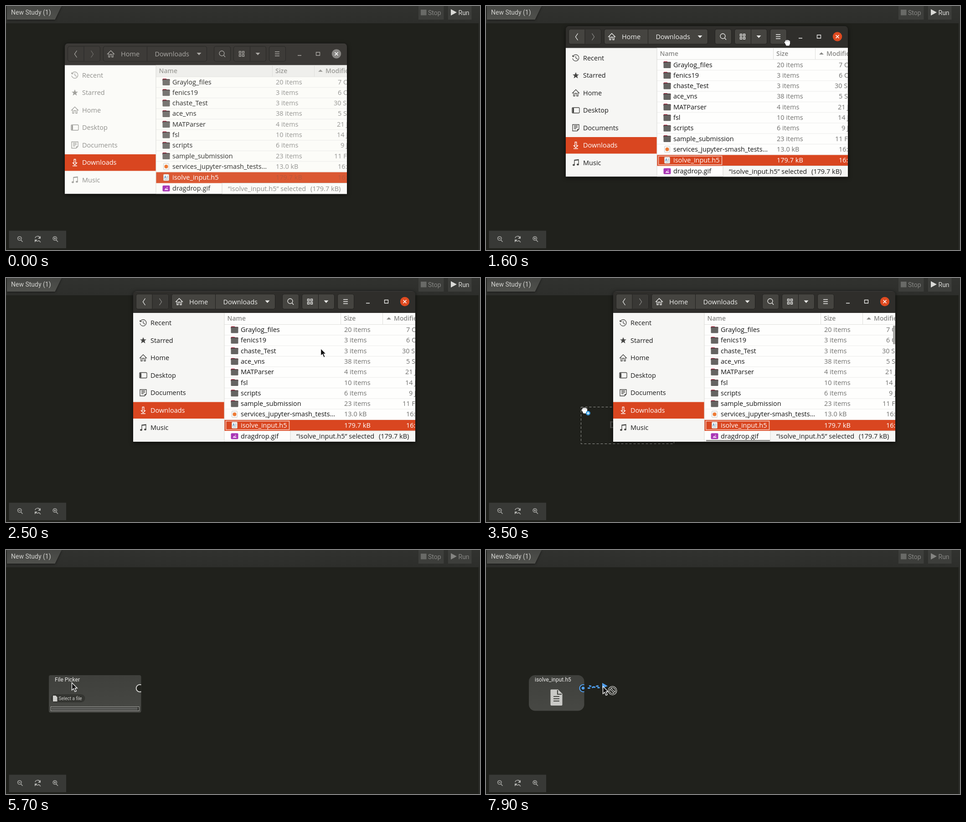
Animation, 1040 px wide and 538 px high, one loop 8000 ms. Source, as an HTML page:

```html
<!DOCTYPE html>
<html lang="en">
<head>
<meta charset="utf-8">
<title>Drag a file into a study</title>
<style>
html, body { margin: 0; width: 100%; height: 100%; overflow: hidden; background: #20211c; }
svg { display: block; width: 100%; height: 100%; }
text { font: 14px Roboto, sans-serif; white-space: pre; }
.line { fill: none; stroke: currentColor; stroke-width: 1.3; }
.solid { fill: currentColor; }
#win {
  --head: #2f2e2b; --btn: #454440; --off: #393835; --edge: #22211f; --headText: #f0f0ee;
  --side: #f6f6f4; --sideText: #1a1a1a; --icon: #454543; --list: #fefefd; --cols: #fdfdfc; --colText: #888886;
  --name: #121212; --size: #70706e; --sel: #d94620; --selSize: #fff; --close: #df4a20; --folder: #656462;
}
#win.back {
  --head: #3b3936; --btn: #3d3b38; --off: #3d3b38; --edge: #292826; --headText: #aaa8a4;
  --side: #fbfbf8; --sideText: #91918d; --icon: #a2a29e; --list: #fcfcf8; --cols: #efefec; --colText: #9d9d99;
  --name: #30302e; --size: #969693; --sel: #db5933; --selSize: #b9583c; --close: #8a8885; --folder: #777572;
}
#win text { font: 14.5px "Open Sans", "Noto Sans", sans-serif; }
#win .col { font-size: 14px; font-weight: 600; fill: var(--colText); }
.head { color: var(--headText); }
.btn { fill: var(--btn); stroke: var(--edge); }
.back .focus { display: none; }
#node text { font-size: 12px; fill: #ededeb; }
#node .chip { font-size: 10px; fill: #cfcfcc; }
</style>
</head>
<body>
<svg id="stage" viewBox="0 0 1040 538"></svg>
<script>
const text = (x, y, s, attr = '') => `<text x="${x}" y="${y}" ${attr}>${s}</text>`;
const rect = (x, y, w, h, fill, attr = '') =>
  `<rect x="${x}" y="${y}" width="${w}" height="${h}" fill="${fill}" ${attr}/>`;
const at = (x, y, body, attr = '') => `<g transform="translate(${x} ${y})" ${attr}>${body}</g>`;
const line = (d, attr = '') => `<path class="line" d="${d}" ${attr}/>`;
const solid = (d, attr = '') => `<path class="solid" d="${d}" ${attr}/>`;
const show = (el, on) => el.style.display = on ? '' : 'none';

// Icons are centred on 0,0
const home = line('M-8 1 0-7 8 1M-5-1V7H-2V1H2V7H5V-1');
const sideItems = [
  ['Recent', line('M-6-4A7 7 0 1 1-7 1M-7-6V-3H-3M0-4V0L4 3')],
  ['Starred', solid('M0-7 2-2H7L3 1 4.5 6.5 0 3.5-4.5 6.5-3 1-7-2H-2Z')],
  ['Home', home],
  ['Desktop', line('M-6-6H6Q8-6 8-4V4Q8 6 6 6H-6Q-8 6-8 4V-4Q-8-6-6-6Z') + solid('M-7-5H-4V5H-7Z')],
  ['Documents', line('M-7-7H7V3L3 7H-7ZM-4-4H4M-4-1H4M-4 2H1') + solid('M7 3H3V7Z')],
  ['Downloads', line('M-1.7-7H1.7V1H4.5L0 5.5-4.5 1H-1.7ZM-5 7.5H5')],
  ['Music', line('M-3 5V-6L6-7V3M-3-5 6-6', 'stroke-width="2"') + solid('M-7 5A2.5 2 0 1 1-2 5 2.5 2 0 1 1-7 5M2 4A2.5 2 0 1 1 7 4 2.5 2 0 1 1 2 4')]
];
const page = rect(-6, -7, 12, 14, '#f8f8f6', 'rx="1.5" stroke="#b9b9b6" stroke-width=".7"');
const folder = rect(-8, -7.5, 9, 5, '#b8364f', 'rx="1.5"') + rect(-8, -6.3, 16, 4, '#4b3438', 'rx="1"') +
  rect(-8, -5, 16, 12.5, 'var(--folder)', 'rx="1.5"');
const note = page + `<path d="M-4 2 -2-4 0 2M-3 0H-1" fill="none" stroke="#3d80c0"/>
  <path d="M1.5-3H4M1.5-1H4M1.5 1H4M-4 4H4" stroke="#8d9ca8"/>`;
const dot = page + '<circle r="4" fill="#ee7b35"/>';
const image = rect(-8, -6.5, 16, 13, '#a936b5', 'rx="2"') +
  '<path d="M-4 3.5-1-1 1 1.5 2.5 0 4.5 3.5ZM1-3H3V-1H1Z" fill="#f3d9f5"/>';

const files = [
  ['Graylog_files', '20 items', '7 Oct', 599], ['fenics19', '3 items', '6 Oct', 599],
  ['chaste_Test', '3 items', '30 Sep', 590], ['ace_vns', '38 items', '5 Sep', 599],
  ['MATParser', '4 items', '21 Jul', 597], ['fsl', '10 items', '14 Jul', 597],
  ['scripts', '6 items', '9 Jul', 605], ['sample_submission', '23 items', '11 Feb', 591],
  ['services_jupyter-smash_tests…', '13.0 kB', '16:20', 599, dot],
  ['isolve_input.h5', '179.7 kB', '16:18', 599, note], ['dragdrop.gif', '', '', 0, image]
];

function fileRow([name, size, date, dateX, icon = folder], i) {
  const y = 85 + 23.3 * i + (i > 8 ? 0.9 * (i - 8) : 0);
  const sel = i == 9;
  const sizeFill = `fill="var(--${sel ? 'selSize' : 'size'})"`;
  return (sel ? rect(200, 284, 419, 24, 'var(--sel)') : rect(200, y + 11.5, 419, 1, '#ececea')) +
    at(222.5, y, icon) + text(236, y + 5, name, `fill="${sel ? '#fff' : 'var(--name)'}"`) +
    text(463, y + 5, size, sizeFill) + text(dateX, y + 5, date, sizeFill);
}

function sideRow([name, icon], i) {
  const y = 70 + 38.5 * i, sel = i == 5;
  return (sel ? rect(0, 244.5, 200, 36.5, '#d94620') : '') +
    `<g class="${i < 2 ? 'dimmable' : ''}">` +
    at(22, y, icon, `style="color:${sel ? '#fff' : 'var(--icon)'}"`) +
    text(38, y + 5, name, `fill="${sel ? '#fff' : 'var(--sideText)'}"`) + '</g>';
}

const button = (x, w) => rect(x + .5, 6.5, w - 1, 33, '', 'rx="4" class="btn"').replace('fill=""', '');
const split = x => rect(x, 7, 1, 32, 'var(--edge)');
const caret = x => solid(`M${x - 5} 20.5H${x + 5}L${x} 26Z`);

const header = `<g class="head">${rect(0, 0, 619, 48, 'var(--head)')}${rect(0, 0, 619, 1, '#fff', 'opacity=".08"')}
  ${[[6, 72], [84, 228], [327, 37], [370, 72], [448, 37]].map(b => button(...b)).join('')}
  ${rect(42, 7, 34.5, 32, 'var(--off)', 'rx="3"')}${[41.5, 180, 406].map(split).join('')}
  ${line('M26.5 16 21.5 23.5 26.5 31', 'stroke-width="1.6"')}${line('M57.5 16 62.5 23.5 57.5 31', 'opacity=".45"')}
  ${at(101, 23, home)}${text(123, 28.5, 'Home', 'class="solid"')}${text(197.5, 28.5, 'Downloads', 'class="solid"')}
  ${caret(294.5)}${caret(423.5)}
  ${line('M350 22A5.5 5.5 0 1 0 339 22 5.5 5.5 0 1 0 350 22M348.5 26 352 30', 'stroke-width="1.6"')}
  ${line('M382.5 17.500h4v4h-4zM389.500 17.500h4v4h-4zM382.500 24.500h4v4h-4zM389.500 24.500h4v4h-4z')}
  ${line('M461 18.500H471M461 23H471M461 27.500H471', 'stroke-width="1.5"')}
  ${line('M511 26.500H519M551.500 19.500h8v7h-8z', 'stroke-width="1.5"')}
  <circle cx="596" cy="23" r="10.2" fill="var(--close)"/>
  <path d="M592.5 19.500l7 7m0-7l-7 7" stroke="#fff" stroke-width="1.6"/></g>`;

const body = rect(0, 48, 200, 284, 'var(--side)') + sideItems.map(sideRow).join('') +
  rect(200, 48, 419, 284, 'var(--list)') + rect(200, 48, 419, 25, 'var(--cols)') +
  [455, 547].map(x => rect(x, 48, 1, 25, '#dededb')).join('') + rect(200, 73, 419, 1, '#e0e0dd') +
  text(206.5, 65, 'Name', 'class="col"') + text(462, 65, 'Size', 'class="col"') + text(572, 65, 'Modified', 'class="col"') +
  '<path d="M556 62.500H566L561 57.500Z" fill="var(--colText)"/>' + files.map(fileRow).join('') +
  rect(203.5, 286.5, 139, 19, 'none', 'class="focus" stroke="#f3c4b6" stroke-width="1.6"') +
  rect(345, 308, 275, 24, 'var(--side)', 'stroke="#d5d5d2"') +
  text(358, 325, '“isolve_input.h5” selected', 'fill="var(--sideText)"') + text(539, 325, '(179.7 kB)', 'fill="var(--sideText)"') +
  rect(199.5, 48, 1, 284, '#d9d9d6') +
  `<g id="bars">${rect(614, 76, 5, 41, '#a9a9a6')}${rect(204, 328, 140, 3, '#91918e')}</g>`;

const magnifier = line('M4-1.500A4.200 4.200 0 1 0-4.400-1.500 4.200 4.200 0 1 0 4-1.500M2.500 2 6.500 6', 'stroke-width="2"');
const zoomBar = rect(6.5, 495.5, 125.5, 38.5, '#383936') + `<g color="#b5b5b2">` +
  at(30, 514, magnifier + line('M-2.400-1.500H2')) +
  at(69, 514, line('M5.500-3.500A5.500 5 0 0 0-5-2M-4.500 2A5 5 0 0 0 3 3.500M2.500 2.500 7 7', 'stroke-width="2"') + solid('M7-7V-1H1ZM-6 7V1H0Z')) +
  at(107.5, 514, magnifier + line('M-2.400-1.500H2M-.2-3.700V.700')) + '</g>';

const toolbar = rect(0, 0, 1040, 38, 'url(#bar)') + rect(1037, 38, 3, 500, '#2c2d29') +
  '<path d="M2 0H122L107.500 30H2Z" fill="url(#tab)" style="filter:drop-shadow(0 1px 2px #0008)"/>' +
  text(11, 19, 'New Study (1)', 'fill="#d3d3d0"') +
  rect(905, 0, 55.5, 30, '#3d3e3b') + rect(910, 8, 12.5, 12.5, '#696a67') + text(926, 19.5, 'Stop', 'fill="#858582"') +
  rect(970, 0, 51.5, 30, '#3d3e3b') + `<g id="run">${solid('M976 7 989 14 976 21Z')}${text(992.5, 19.5, 'Run', 'class="solid"')}</g>`;

const picker = `<g id="picker">${rect(94, 276, 202.5, 82.5, 'url(#card)', 'rx="4"')}${text(107, 290, 'File Picker')}
  <path d="M296.500 297.300A8 8 0 1 0 296.500 312.300" fill="#20211c" stroke="#d0d0cd" stroke-width="2"/>
  ${rect(98.5, 318, 75, 18, '#343531', 'rx="9"')}
  <path d="M103 321H109L112.500 324.500V334H103Z" fill="#cfcfcc"/>${text(115.5, 331, 'Select a file', 'class="chip"')}
  ${rect(98.5, 345.5, 193.5, 9, '#252622', 'stroke="#b0b0ad"')}${rect(100, 347, 0, 6, '#5b5c59', 'id="progress"')}</g>`;

const filled = `<g id="filled">${rect(94, 276, 121.5, 78.5, 'url(#card)', 'rx="14"')}${text(107, 290, 'isolve_input.h5')}
  <g id="doc"><path d="M143 307.500H158L167.500 317V341Q167.500 343 165.500 343H143.500Q141.500 343 141.500 341V309.500Q141.500 307.500 143 307.500Z" fill="#c9c9c6"/>
  <path d="M157 309V318H166M148 323H161M148 328H161M148 333H161" fill="none" stroke="#444541" stroke-width="2.200"/></g>
  <path id="port" d="M215.500 297.300A7.800 7.800 0 1 0 215.500 312.300" fill="#20211c" stroke-width="2"/></g>`;

const edge = `<g id="edge" fill="none" stroke="#509fee" stroke-width="3"><circle cx="213" cy="304.500" r="3.300" fill="#509fee" stroke="none"/>
  <path id="wireA" stroke-dasharray="5.500 4"/><path id="wireB" stroke-dasharray="5 4.500" stroke-dashoffset="-3"/>
  <path id="tip" d="M-1-7 11 0-1 5Z" fill="#509fee" stroke="none"/></g>`;

const cursor = `<g id="cursor"><g id="carried">${at(8.5, 9, note)}</g>
  <path id="arrow" d="M.5.500V17L4.300 13.500 7.200 20.500 10.200 19.200 7.300 12.500H12.300Z" fill="#111" stroke="#fff" stroke-width="1.300"/>
  <g id="hand"><path d="M3 10 1 7Q.5 5 3 5.500L3.500 3Q4.500 1 6 2.500 7 .500 9 2 11 1 12 3 14.500 2.500 14.500 5V10L12.500 15H5.500Z" fill="#fff" stroke="#222" stroke-width=".9"/>
  <path d="M6.200 3V6M9 3V6M12 4V6.500" stroke="#777" stroke-width=".7"/></g>
  <g id="plus"><circle cx="16" cy="14" r="5" fill="#2f96dc"/><path d="M13 14H19M16 11V17" stroke="#fff" stroke-width="1.500"/></g>
  <g id="forbid" fill="none"><path id="ring" d="M29.500 10A8 8 0 1 0 13.500 10 8 8 0 1 0 29.500 10M16 4.500 27 15.500" stroke="#f0f0ee" stroke-width="4"/>
  <path d="M29.500 10A8 8 0 1 0 13.500 10 8 8 0 1 0 29.500 10M16 4.500 27 15.500" stroke="#20211c" stroke-width="1.800"/></g></g>`;

const fade = (id, a, b) => `<linearGradient id="${id}" x2="0" y2="1"><stop stop-color="${a}"/><stop offset="1" stop-color="${b}"/></linearGradient>`;
const frame = 'M0 332V8Q0 0 8 0H611Q619 0 619 8V332Z';

stage.innerHTML = `<defs>${fade('bar', '#31322f', '#2d2e2b')}${fade('tab', '#454643', '#50514d')}${fade('card', '#3f403c', '#474844')}
  <clipPath id="clip"><path d="${frame}"/></clipPath></defs>
  ${rect(0, 0, 1040, 538, '#20211c')}${toolbar}${zoomBar}<g id="node">${picker}${filled}</g>${edge}
  <g id="drop">${rect(.5, .5, 204, 81, 'none', 'stroke="#9a9b97" stroke-dasharray="5 4"')}
  ${text(63, 47, 'Drop me', 'fill="#4c4d4a" style="font-size:20px;font-weight:700"')}</g>
  <g id="win"><path d="${frame}" fill="#222" style="filter:drop-shadow(0 2px 5px #000a)"/><g clip-path="url(#clip)">${header}${body}</g></g>
  ${cursor}`;

const $ = id => document.getElementById(id);
const dimmable = document.querySelectorAll('.dimmable');

// Keys are [time, x, y], joined by straight moves
const winPath = [[0, 129, 82.5], [1300, 129, 82.5], [1400, 134, 79], [1600, 175, 44.5], [2000, 254.6, 34.5], [2100, 279, 29]];
const cursorPath = [
  [400, 380, 41], [500, 520, 66], [600, 621, 87], [700, 621, 87], [1200, 643, 110], [1300, 643, 110],
  [1400, 636, 106], [1600, 653, 73], [2000, 725, 63], [2100, 750, 57], [2200, 750, 57], [2700, 650, 220],
  [3100, 575, 318], [3200, 565, 318], [3500, 208, 284], [4000, 121, 280], [4700, 93, 274.5], [4800, 83, 265],
  [4900, 83, 265], [5400, 135, 280], [5600, 135, 280], [5700, 144, 292], [6100, 213, 296], [6700, 213, 296],
  [7100, 202, 297], [7400, 206, 300], [7500, 206, 300], [7600, 207, 301], [7700, 207, 301], [7800, 236, 300], [7900, 256, 300]
];

function track(keys, t) {
  const i = keys.findIndex(k => k[0] > t);
  if (i < 0) return keys.at(-1).slice(1);
  if (i == 0) return keys[0].slice(1);
  const [a, b] = [keys[i - 1], keys[i]];
  const p = (t - a[0]) / (b[0] - a[0]);
  return [1, 2].map(n => a[n] + (b[n] - a[n]) * p);
}
const place = (el, x, y) => el.setAttribute('transform', `translate(${x} ${y})`);

function draw(t) {
  const during = (a, b) => t >= a && t < b;
  const [x, y] = track(cursorPath, t);

  place($('win'), ...track(winPath, t));
  show($('win'), t < 4800);
  $('win').classList.toggle('back', t < 1400);
  $('bars').style.opacity = during(2700, 4200) ? 1 : during(4200, 4800) ? .25 : 0;
  dimmable.forEach(el => el.style.opacity = during(3300, 3500) ? .5 : 1);
  $('run').style.color = t < 4800 ? '#dadad7' : '#858582';

  place($('drop'), x, y);
  show($('drop'), during(3400, 4800));
  show($('picker'), during(4800, 6400));
  $('progress').setAttribute('width', 189 * Math.min(1, Math.max(0, (t - 4900) / 500)));
  show($('filled'), t >= 6400);
  show($('doc'), t >= 6500);
  $('port').setAttribute('stroke', t < 7100 ? '#d0d0cd' : '#509fee');

  const linking = t >= 7800;
  show($('edge'), linking);
  if (linking) {
    const mid = (213 + x) / 2;
    $('wireA').setAttribute('d', `M223 304.500C${mid} 305 ${mid} 300 ${x - 5} 299.500`);
    $('wireB').setAttribute('d', `M223 300C${mid} 299 ${mid} 304 ${x - 5} 303.500`);
    place($('tip'), x, y);
  }

  const carrying = during(3200, 4700);
  const grabbing = during(1400, 2300) || carrying;
  place($('cursor'), x, y);
  show($('cursor'), t >= 400);
  show($('arrow'), !grabbing);
  show($('hand'), grabbing);
  show($('plus'), carrying);
  show($('carried'), during(4700, 4800));
  show($('forbid'), linking);
}

const start = performance.now();
function tick() {
  const t = (performance.now() - start) % 8000;
  draw(Math.floor(t / 100) * 100);
  requestAnimationFrame(tick);
}
tick();
</script>
</body>
</html>
```
